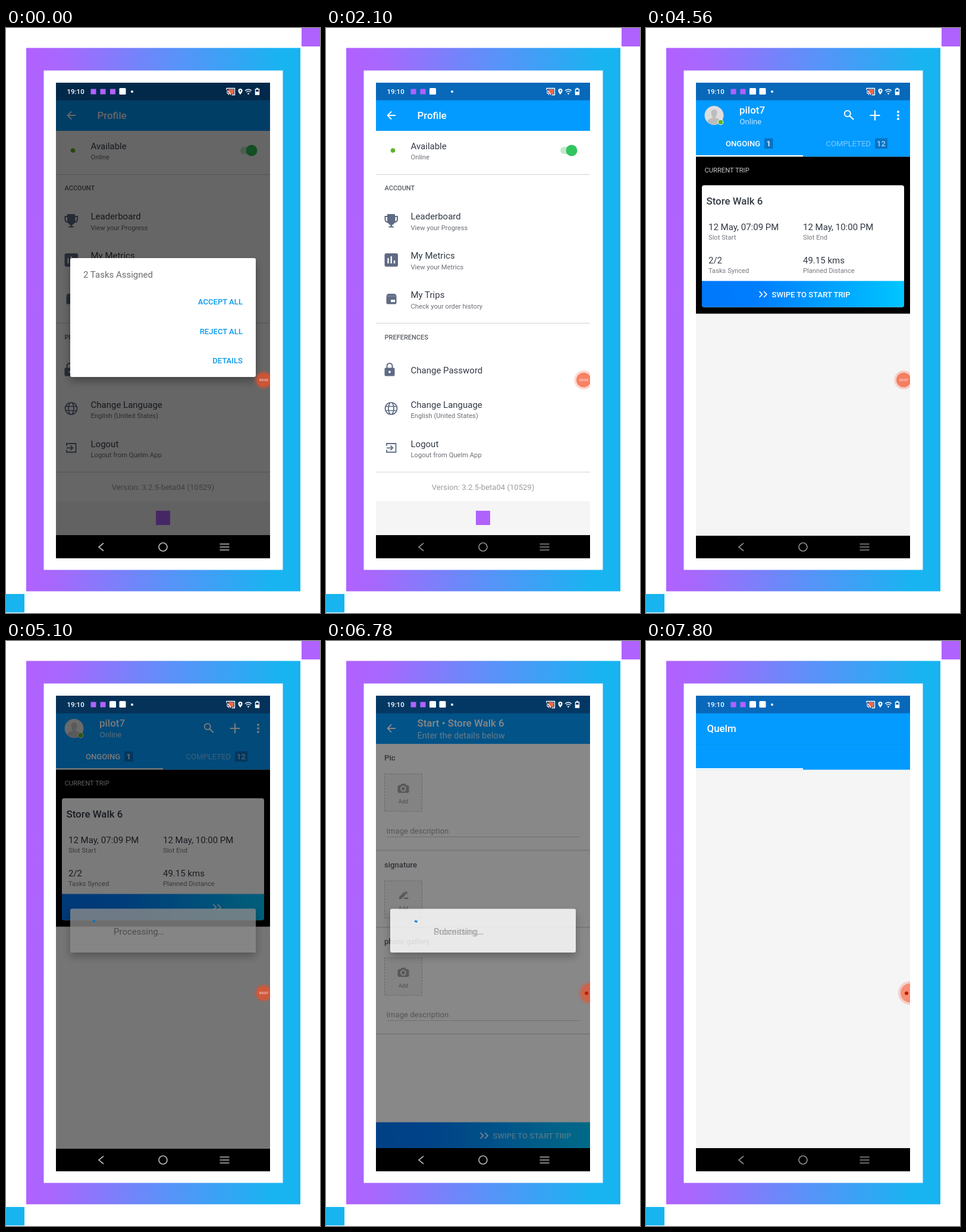
An HTML page that plays this animation: 528 by 984 pixels, repeating every 8000 ms.

```html
<!DOCTYPE html>
<html lang="en">
<head>
<meta charset="utf-8">
<title>Trip start</title>
<style>
html, body { margin: 0; width: 528px; height: 984px; overflow: hidden; background: #fff; }
svg { display: block; font-family: Roboto, sans-serif; }
</style>
</head>
<body>
<svg id="stage" width="528" height="984" viewBox="0 0 528 984"></svg>
<script>
const LOOP = 8000, STEP = 60;
const BLUE = '#039bff', SLATE = '#5f6b85', MARK = '#b062ff';
const SMALL = 11.2, MEDIUM = 13.1, LARGE = 15, TITLE = 16.9;

const text = (x, y, size, str, fill = '#333a45', weight = 400, anchor = 'start') =>
  `<text x="${x}" y="${y}" font-size="${size}" fill="${fill}" font-weight="${weight}" text-anchor="${anchor}">${str}</text>`;
const rect = (x, y, w, h, fill, extra = '') =>
  `<rect x="${x}" y="${y}" width="${w}" height="${h}" fill="${fill}" ${extra}/>`;
const disc = (x, y, r, fill, extra = '') => `<circle cx="${x}" cy="${y}" r="${r}" fill="${fill}" ${extra}/>`;
const stroke = (d, color, w = 1, extra = '') =>
  `<path d="${d}" fill="none" stroke="${color}" stroke-width="${w}" ${extra}/>`;
const shape = (d, fill) => `<path d="${d}" fill="${fill}" fill-rule="evenodd"/>`;
const rule = (y, x1 = 84, x2 = 444, color = '#d2d2d4') => stroke(`M${x1} ${y}H${x2}`, color);
const group = (id, body, extra = '') => `<g id="${id}" ${extra}>${body}</g>`;

const backArrow = stroke('M117 147H104M110 140.5L103.5 147L110 153.5', '#fff', 1.8);
const bag = x => rect(x - 5.5, 101, 11, 11, '#fff', 'rx="1.5"');
const mark = x => rect(x - 4.5, 102.5, 9, 9, MARK);

const swipeBar = (id, x, y, w, h) =>
  rect(x, y, w, h, 'url(#swipe)') +
  group(id,
    stroke(`M190.5 ${y + 17.5}l5 5l-5 5M198 ${y + 17.5}l5 5l-5 5`, '#fff', 1.6) +
    `<g class="label">${text(211.5, y + 27.5, MEDIUM, 'SWIPE TO START TRIP', '#fff', 500)}</g>`);

function profile() {
  const row = (y, title, sub) => text(142.5, y, LARGE, title) + (sub ? text(142.5, y + 17.5, SMALL, sub, '#6b6e75') : '');
  const icons =
    shape('M103 313h13v3h5v6q0 5-6 6q-1 3-4 3.5v2h3v2h-8.5v-2h3v-2q-3-.5-4-3.5q-6-1-6-6v-6h4.5zM100.5 318v4q0 2.5 2.5 3.5v-7.5zM116.500 318v7.5q2.5-1 2.5-3.5v-4z', SLATE) +
    rect(98.5, 379, 22.5, 22.5, SLATE, 'rx="3"') +
    stroke('M104.5 387V396M109.7 384V396M115 391V396', '#fff', 2.3) +
    shape('M104 447h12l2.5 3v12q0 2.5-2.5 2.5h-12q-2.5 0-2.5-2.5v-12zM109 457v4h7v-4z', SLATE) +
    stroke('M101.5 451H118.5', '#8e97aa') +
    rect(98.5, 571.5, 17, 14, SLATE, 'rx="2"') +
    stroke('M102.5 572V568.5a4.5 4.5 0 0 1 9 0V572', SLATE, 2) + disc(107, 578.5, 2, '#fff') +
    stroke('M99.5 640a10 10 0 1 0 20 0a10 10 0 1 0-20 0M105 640a4.5 10 0 1 0 9 0a4.5 10 0 1 0-9 0M100.5 636.5H118.5M100.5 643.5H118.5', SLATE, 1.7) +
    stroke('M102 703V699H117.5V713.5H102V709.5M102 706.3H112M108.5 702.5L112.3 706.3L108.5 710', SLATE, 1.8);
  return rect(84, 122, 360, 731, '#fff') + rect(84, 122, 360, 51, BLUE) +
    backArrow + text(153.5, 153, TITLE, 'Profile', '#fff', 500) +
    disc(112.5, 206, 3.8, '#5cb524') + row(203.5, 'Available', 'Online') +
    rect(394, 200, 26, 12, '#c2e9cd', 'rx="6"') + disc(413, 206, 9.5, '#30c55e') +
    rule(246.5) + text(98.5, 273, 11, 'ACCOUNT', '#5b5e66', 500) +
    row(322, 'Leaderboard', 'View your Progress') +
    row(388, 'My Metrics', 'View your Metrics') +
    row(454, 'My Trips', 'Check your order history') +
    rule(496.5) + text(98.5, 523.5, 11, 'PREFERENCES', '#5b5e66', 500) +
    row(580.5, 'Change Password') +
    row(638.5, 'Change Language', 'English (United States)') +
    row(704.5, 'Logout', 'Logout from Quelm App') +
    icons + rule(747) +
    text(264, 776.5, MEDIUM, 'Version: 3.2.5-beta04 (10529)', '#9a9ca1', 400, 'middle') +
    rect(84, 796, 360, 57, '#f5f5f5') + rect(252, 812, 24, 24, MARK);
}

function home() {
  const pair = (x, y, value, label) => text(x, y, LARGE, value) + text(x, y + 16.5, SMALL, label, '#75787f');
  const badge = (x, w, n, color) => rect(x, 185.5, w, 17.5, '#0873c4') +
    text(x + w / 2, 199, MEDIUM, n, color, 500, 'middle');
  return rect(84, 122, 360, 732, '#f5f5f5') + rect(84, 122, 360, 94.5, BLUE) +
    disc(114.5, 147, 16, '#dedede') +
    shape('M114.5 137q5 0 5 6q0 4-2.5 6v2q8 2 9.5 6a16 16 0 0 1-24 0q1.5-4 9.5-6v-2q-2.5-2-2.5-6q0-6 5-6z', '#bcbcbc') +
    disc(125.5, 158.5, 4.3, '#5cb524', 'stroke="#fff"') +
    text(157, 143.5, TITLE, 'pilot7', '#fff', 500) + text(157.5, 162, MEDIUM, 'Online', '#bfe5ff') +
    disc(338.8, 144, 5, 'none', 'stroke="#fff" stroke-width="2"') +
    stroke('M342.5 148L349 154M376.5 147H393.5M385 138.5V155.5', '#fff', 2.2) +
    [141, 147, 153].map(y => disc(424, y, 2, '#fff')).join('') +
    text(134, 199, MEDIUM, 'ONGOING', '#fff', 500) + badge(199, 14.5, '1', '#fff') +
    text(302.5, 199, MEDIUM, 'COMPLETED', '#7fcaff') + badge(385, 21, '12', '#a5d6fb') +
    rect(84, 214, 180, 2.5, '#fff') +
    rect(84, 216.5, 360, 264, '#000') + text(98.5, 242.5, SMALL, 'CURRENT TRIP', '#c9c9c9') +
    rect(94, 264.5, 340, 205, '#fff', 'rx="4"') +
    text(101.5, 297, TITLE, 'Store Walk 6', '#333a45', 500) +
    pair(105, 339.5, '12 May, 07:09 PM', 'Slot Start') + pair(264, 339.5, '12 May, 10:00 PM', 'Slot End') +
    pair(105, 395.5, '2/2', 'Tasks Synced') + pair(264, 395.5, '49.15 kms', 'Planned Distance') +
    `<g clip-path="url(#card)">${swipeBar('homeSwipe', 94, 425.5, 340, 44)}</g>`;
}

function form() {
  const camera = y => shape(`M127 ${y - 8}h6l2 2.5h2q2.5 0 2.5 2.5v8q0 2.5-2.5 2.5h-14q-2.5 0-2.5-2.5v-8q0-2.5 2.5-2.5h2zM130 ${y - 4.5}a5 5 0 1 0 .01 0z`, '#a3a5a9') +
    disc(130, y + .5, 3, '#a3a5a9');
  const pencil = y => shape(`M123 ${y + 6}v-3.5l8-8l3.5 3.5l-8 8zM132 ${y - 5.5}l2-2l3.5 3.5l-2 2zM130 ${y + 6}l2-2.5h6.5v2.5z`, '#a3a5a9');
  const slot = (y, icon) => rect(98.5, y + .5, 63, 63, '#f5f5f5', 'stroke="#bdbdbd" stroke-dasharray="3 2"') +
    icon(y + 25) + text(130, y + 50, 9.3, 'Add', '#8c8e93', 400, 'middle');
  const head = (y, str) => text(98, y, MEDIUM, str, '#5b5e66', 500);
  const note = y => text(101.5, y, MEDIUM, 'Image description', '#9b9da2') + rule(y + 5.5, 102, 426);
  return rect(84, 122, 360, 731, '#fff') + rect(84, 122, 360, 51, BLUE) + backArrow +
    text(153.5, 143.5, TITLE, 'Start • Store Walk 6', '#fff', 500) +
    text(153.5, 164, 14.6, 'Enter the details below', '#bfe5ff') +
    head(200.5, 'Pic') + slot(223, camera) + note(324) + rule(352, 84, 444, '#c6c8cb') +
    head(380.5, 'signature') + slot(403, pencil) + rule(481.5, 84, 444, '#c6c8cb') +
    head(510, 'photo gallery') + slot(532.5, camera) + note(633) + rule(661, 84, 444, '#c6c8cb') +
    swipeBar('formSwipe', 84, 809.5, 360, 43.5);
}

const launch = () => rect(84, 122, 360, 731, '#f5f5f5') + rect(84, 122, 360, 94.5, BLUE) +
  rule(173.5, 84, 444, '#0592f0') + rect(84, 214, 180, 2.5, '#fff') +
  text(102.5, 153, TITLE, 'Quelm', '#fff', 500);

const statusBar = () => rect(84, 92, 360, 30, '#0868ba') + rect(84, 121, 360, 1, '#0a7ad4');
const statusIcons = () =>
  text(102.5, 111, 11.5, '19:10', '#fff', 500) + mark(147) + mark(163) +
  group('slot3', mark(179.5)) + group('bag3', bag(179.5)) + group('bag4', bag(196)) + disc(212, 107, 2, '#fff') +
  rect(374, 103, 9, 8, '#e8664a') +
  stroke('M371 104V101.5H384.5V112.5H379.5M371 106a6.5 6.5 0 0 1 6.5 6.5M371 109a3.5 3.5 0 0 1 3.5 3.5', '#fff', 1.3) +
  shape('M394 102a3.6 3.6 0 0 1 3.6 3.6q0 2.4-3.6 6.4q-3.6-4-3.6-6.4a3.6 3.6 0 0 1 3.6-3.6zM394 104.3a1.3 1.3 0 1 0 .01 0z', '#fff') +
  stroke('M402 105.5q5.5-4.5 11 0M404 107.8q3.5-3 7 0', '#fff', 1.3) + disc(407.5, 110.5, 1.3, '#fff') +
  stroke('M419.5 103H425.5V112H419.5zM421 101.5H424', '#fff', 1.4) + rect(420, 107, 5, 5, '#fff');
const navBar = () => rect(84, 854, 360, 38, '#000') + group('nav',
  '<path d="M164 866.5L156 873L164 879.5"/><circle cx="264" cy="873" r="7"/><path d="M359.5 868H375.5M359.5 873H375.5M359.5 878H375.5"/>',
  'fill="none" stroke-width="1.7"');

const taskDialog = () => rect(108, 387, 312, 200, '#fff', 'rx="3" filter="url(#shadow)"') +
  text(130, 419.5, LARGE, '2 Tasks Assigned', '#6b6b6b') +
  [['ACCEPT ALL', 465], ['REJECT ALL', 514.5], ['DETAILS', 564]]
    .map(([str, y]) => text(398, y, MEDIUM, str, '#0a9bee', 500, 'end')).join('');
const busyDialog = () => rect(108, 450.5, 312, 73.5, '#fff', 'rx="3" filter="url(#shadow)"') +
  group('processing', text(181, 493.5, LARGE, 'Processing…', '#777')) +
  group('submitting', text(181, 493.5, LARGE, 'Submitting…', '#777')) +
  group('busyShade', rect(108, 450.5, 312, 73.5, '#000', 'rx="3"')) +
  '<path id="spinner" fill="none" stroke="#118bea" stroke-width="3.5"/>';

const bubble = () =>
  group('clock', disc(433.3, 592, 16, '#f5502a', 'opacity=".22"') + disc(433.3, 592, 12.3, '#f54d22', 'opacity=".62"') +
    '<text id="count" x="433.500" y="594.2" font-size="6" fill="#fff" text-anchor="middle"></text>') +
  group('docked', disc(444, 592, 20, '#f5502a', 'opacity=".22"') + disc(444, 592, 16, '#f54d22', 'opacity=".5"') +
    disc(438, 592.5, 3, '#c41a08'));

document.getElementById('stage').innerHTML = `<defs>
  <linearGradient id="frame" x1=".03" y1="0" x2=".93" y2=".03"><stop offset="0" stop-color="#b062ff"/>
    <stop offset=".12" stop-color="#a768fe"/><stop offset=".55" stop-color="#5d90f9"/><stop offset="1" stop-color="#18b4f1"/></linearGradient>
  <linearGradient id="swipe"><stop offset="0" stop-color="#0078fa"/><stop offset=".28" stop-color="#007eff"/><stop offset="1" stop-color="#00c6ff"/></linearGradient>
  <filter id="shadow" x="-10%" y="-30%" width="120%" height="170%"><feDropShadow dx="0" dy="7" stdDeviation="7" flood-opacity=".32"/></filter>
  <clipPath id="phone"><rect x="84" y="92" width="360" height="800"/></clipPath>
  <clipPath id="card"><path d="M94 425H434V466a4 4 0 0 1-4 4H98a4 4 0 0 1-4-4z"/></clipPath></defs>` +
  rect(34, 33.5, 461, 914, 'url(#frame)') + rect(63.5, 71.5, 402, 840, '#fff') +
  rect(497, 0, 31, 31, MARK) + rect(0, 952, 31, 31, '#18b4f0') +
  group('screen',
    rect(84, 92, 360, 800, '#000') + statusBar() +
    group('home', home()) + group('profile', profile()) + group('form', form()) + group('launch', launch()) +
    group('dim', rect(84, 92, 360, 800, '#000')) + navBar() + statusIcons() +
    group('tasks', taskDialog()) + group('busy', busyDialog()) + bubble(),
    'clip-path="url(#phone)"');

// Each track lists time, value pairs.
const tracks = {
  dim: [0, .6, 1680, .6, 1980, 0, 5000, 0, 5100, .52, 5340, .54, 5460, 0,
        6620, 0, 6780, .465, 6840, .54, 7140, .54, 7320, 0],
  tasks: [1620, 1, 1800, 0],
  home: [2940, 0, 3000, 1, 5520, 1, 5580, 0],
  profile: [3000, 1, 3240, 0],
  form: [5340, 0, 5520, 1],
  launch: [7380, 0, 7560, 1],
  busy: [4980, 0, 5100, .8, 5160, 1, 5340, 1, 5460, 0, 6660, 0, 6780, .82, 6840, 1, 7140, 1, 7260, 0],
  busyShade: [5100, .46, 5220, 0],
  processing: [6720, 1, 6840, 0],
  submitting: [6720, 0, 6840, 1],
  homeSwipe: [4740, 0, 5040, 185, 5100, 158, 5280, 0],
  formSwipe: [6420, 0, 6640, 185, 6780, 69, 6880, 0]
};
const ticks = [1020, 1980, 2880, 3720, 4560, 5520];
const el = id => document.getElementById(id);

function value(track, t) {
  let i = 0;
  while (i < track.length && track[i] <= t) i += 2;
  if (i === 0) return track[1];
  if (i >= track.length) return track[track.length - 1];
  const [t0, v0, t1, v1] = track.slice(i - 2, i + 2);
  return v0 + (v1 - v0) * (t - t0) / (t1 - t0);
}

function show(id, opacity) {
  el(id).setAttribute('opacity', opacity);
  el(id).setAttribute('display', opacity > 0 ? 'inline' : 'none');
}

function spin(ms) {
  const point = a => `${147 + 16.5 * Math.sin(a)} ${487.5 - 16.5 * Math.cos(a)}`;
  const from = ms * .003;
  const sweep = .25 + 2.3 * (1 - Math.cos(Math.max(0, ms) * .0047));
  el('spinner').setAttribute('d', `M${point(from)}A16.5 16.5 0 ${sweep > Math.PI ? 1 : 0} 1 ${point(from + sweep)}`);
}

function draw(time) {
  const t = Math.floor(time % LOOP / STEP) * STEP;
  for (const id in tracks) {
    const v = value(tracks[id], t);
    if (id.endsWith('Swipe')) {
      el(id).setAttribute('transform', `translate(${v} 0)`);
      el(id).querySelector('.label').setAttribute('opacity', Math.max(0, 1 - v / 160));
    } else show(id, v);
  }
  const shade = Math.round(138 + 80 * value(tracks.dim, t));
  el('nav').setAttribute('stroke', `rgb(${shade},${shade},${shade})`);
  show('slot3', t < 1980 ? 1 : 0);
  show('bag3', t < 1980 ? 0 : 1);
  show('bag4', t < 1980 || t >= 3060 ? 1 : 0);
  show('clock', t < 5580 ? 1 : 0);
  show('docked', t < 5580 ? 0 : 1);
  el('count').textContent = '00:0' + (2 + ticks.filter(at => t >= at).length);
  spin(t < 6000 ? t - 5120 : t - 6740);
}

const start = performance.now();
function tick() {
  draw(performance.now() - start);
  requestAnimationFrame(tick);
}
tick();
</script>
</body>
</html>
```
